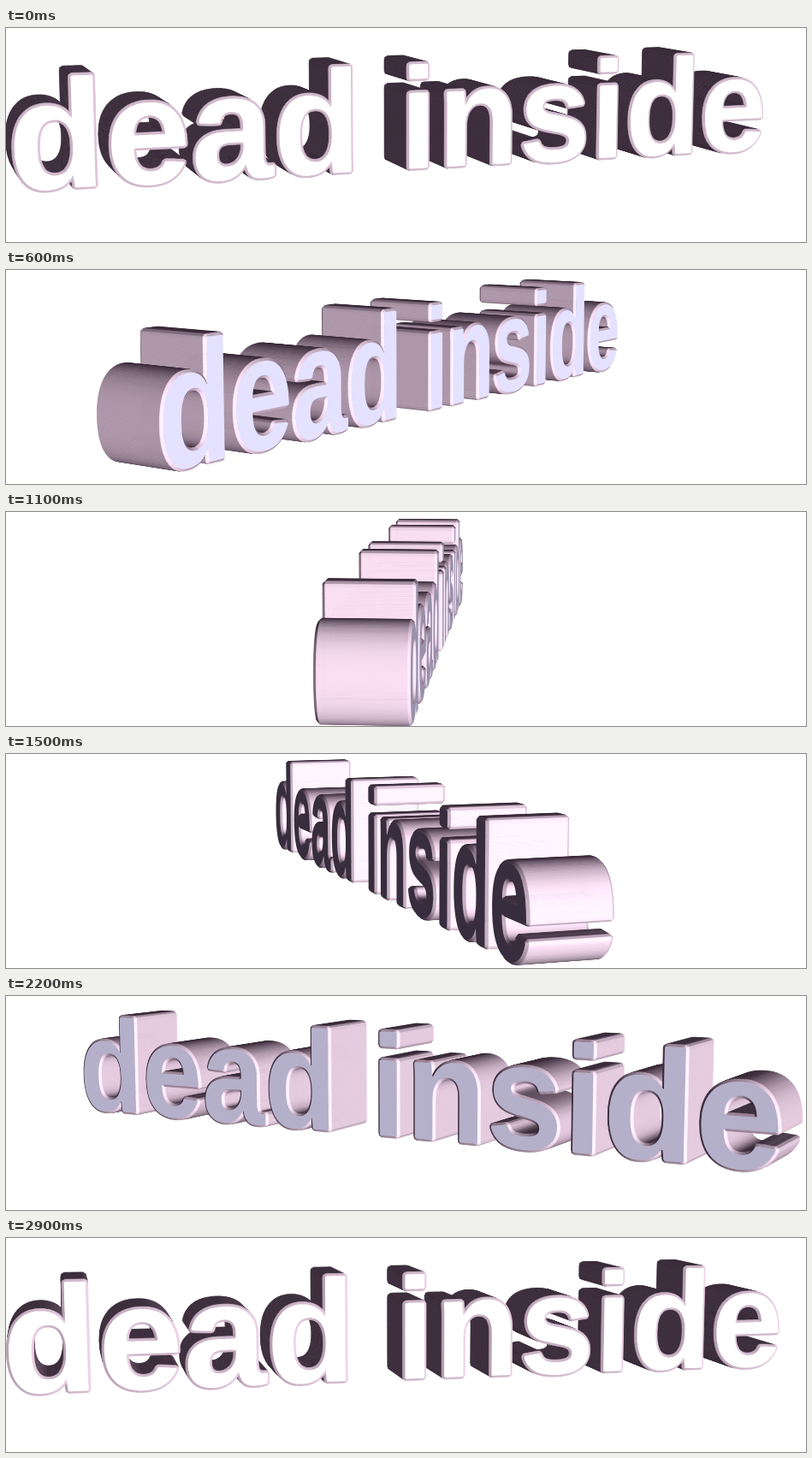
Animation of 935x250 px, one loop 3000 ms. Source, as an HTML page with a canvas:

```html
<!DOCTYPE html>
<html lang="en">
<head>
<meta charset="utf-8">
<title>dead inside</title>
<style>
  html, body { margin: 0; height: 100%; overflow: hidden; background: #fff; }
  canvas { display: block; }
</style>
</head>
<body>
<canvas id="stage" width="935" height="250"></canvas>
<script>
const TEXT = 'dead inside';
const FONT = 'bold 166px Arial, "Liberation Sans", sans-serif';
const CENTER = { x: 468, y: 105 };
const BASELINE = 53, HALF_DEPTH = 43, BEVEL = 2.5;
const DISTANCE = 1800, PITCH = Math.asin(0.13), LIGHT = 23 * Math.PI / 180;
const SIDE = { dark: [58, 43, 58], gain: [217, 203, 210] };
const FACE = { dark: [55, 45, 62], gain: [204, 213, 228] };
// Wall bands from back to front: start z, start offset, end z, end offset, normal z
const BANDS = [
  [-HALF_DEPTH, 0, BEVEL - HALF_DEPTH, BEVEL, -1],
  [BEVEL - HALF_DEPTH, BEVEL, HALF_DEPTH - BEVEL, BEVEL, 0],
  [HALF_DEPTH - BEVEL, BEVEL, HALF_DEPTH, 0, 1]
];

const ctx = document.getElementById('stage').getContext('2d');

// Follow the half-alpha contour of a glyph; the outside lies along (dy, -dx).
function traceGlyph(char) {
  const w = 150, h = 180, left = 15, base = 145;
  const pad = document.createElement('canvas');
  pad.width = w;
  pad.height = h;
  const g = pad.getContext('2d', { willReadFrequently: true });
  g.font = FONT;
  g.fillText(char, left, base);
  const pixels = g.getImageData(0, 0, w, h).data;
  const alpha = ([x, y]) => pixels[4 * (y * w + x) + 3];
  const links = new Map();

  for (let y = 0; y < h - 1; y++) {
    for (let x = 0; x < w - 1; x++) {
      const corners = [[x, y], [x + 1, y], [x + 1, y + 1], [x, y + 1]];
      const edges = [[x, y, 0], [x + 1, y, 1], [x, y + 1, 0], [x, y, 1]];
      const crossings = [];
      corners.forEach((p, i) => {
        const q = corners[(i + 1) % 4], a = alpha(p), b = alpha(q);
        if ((a > 127) === (b > 127)) return;
        const t = (127.5 - a) / (b - a), [ex, ey, side] = edges[i];
        crossings.push({
          key: 2 * (ey * w + ex) + side,
          exit: a > 127,
          point: [p[0] + (q[0] - p[0]) * t - left + 0.5,
                  p[1] + (q[1] - p[1]) * t - base + 0.5]
        });
      });
      crossings.forEach((c, i) => {
        if (c.exit) links.set(c.key, { point: c.point, next: crossings[(i + 1) % crossings.length].key });
      });
    }
  }

  const loops = [];
  while (links.size) {
    let key = links.keys().next().value;
    const loop = [];
    while (links.has(key)) {
      const link = links.get(key);
      links.delete(key);
      loop.push(link.point);
      key = link.next;
    }
    loops.push(withNormals(thin(loop)));
  }
  return loops;
}

// Smooth lightly and keep every second point.
function thin(loop) {
  const n = loop.length;
  return loop
    .map((p, i) => p.map((v, k) => (loop[(i + n - 1) % n][k] + 2 * v + loop[(i + 1) % n][k]) / 4))
    .filter((p, i) => i % 2 === 0);
}

function withNormals(loop) {
  const n = loop.length;
  return loop.map(([x, y], i) => {
    const a = loop[(i + n - 1) % n], b = loop[(i + 1) % n];
    const dx = b[0] - a[0], dy = b[1] - a[1], len = Math.hypot(dx, dy) || 1;
    return { x, y, nx: dy / len, ny: -dx / len };
  });
}

function buildGlyphs() {
  ctx.font = FONT;
  const width = s => ctx.measureText(s).width;
  const total = width(TEXT), shapes = {};
  return [...TEXT].map((char, i) => {
    const x0 = width(TEXT.slice(0, i)) - total / 2;
    shapes[char] ||= traceGlyph(char);
    const loops = shapes[char].map(loop =>
      loop.map(p => ({ ...p, x: p.x + x0, y: p.y + BASELINE })));
    const walls = loops.flatMap(loop => loop.map((p, k) => [p, loop[(k + 1) % loop.length]]));
    return { loops, walls, mid: x0 + width(char) / 2 };
  });
}

const glyphs = buildGlyphs();

function draw(yaw) {
  const sin = Math.sin(yaw), cos = Math.cos(yaw);
  const sinP = Math.sin(PITCH), cosP = Math.cos(PITCH);
  const eye = { x: -DISTANCE * cosP * sin, y: -DISTANCE * sinP, z: DISTANCE * cosP * cos };

  const project = (x, y, z) => {
    const depth = z * cos - x * sin;
    const scale = DISTANCE / (DISTANCE - depth * cosP + y * sinP);
    return [CENTER.x + (x * cos + z * sin) * scale,
            CENTER.y + (y * cosP + depth * sinP) * scale];
  };
  const shade = (material, nx, ny, nz) => {
    const lit = ((nx * cos + nz * sin) * Math.sin(LIGHT) + (nz * cos - nx * sin) * Math.cos(LIGHT))
      / Math.hypot(nx, ny, nz);
    const rgb = material.dark.map((v, i) => Math.min(255, Math.round(v + material.gain[i] * Math.max(0, lit))));
    return `rgb(${rgb})`;
  };
  const addPath = points => {
    points.forEach((p, i) => i ? ctx.lineTo(...p) : ctx.moveTo(...p));
    ctx.closePath();
  };
  const corner = (p, z, r) => project(p.x + p.nx * r, p.y + p.ny * r, z);
  const range = p => Math.hypot(p.x - eye.x, p.y - eye.y);

  const drawWall = ([a, b]) => {
    const nx = a.nx + b.nx, ny = a.ny + b.ny, len = Math.hypot(nx, ny) || 1;
    const ux = nx / len, uy = ny / len;
    for (const [z0, r0, z1, r1, nz] of BANDS) {
      const facing = ux * (eye.x - a.x - ux * BEVEL) + uy * (eye.y - a.y - uy * BEVEL)
        + nz * (eye.z - (z0 + z1) / 2);
      if (facing <= 0) continue;
      ctx.beginPath();
      addPath([corner(a, z0, r0), corner(b, z0, r0), corner(b, z1, r1), corner(a, z1, r1)]);
      ctx.fillStyle = ctx.strokeStyle = shade(SIDE, ux, uy, nz);
      ctx.fill();
      ctx.stroke();
    }
  };

  ctx.fillStyle = '#fff';
  ctx.fillRect(0, 0, 935, 250);
  ctx.lineWidth = 0.7;
  ctx.lineJoin = 'round';
  glyphs.sort((a, b) => Math.abs(b.mid - eye.x) - Math.abs(a.mid - eye.x));
  for (const { loops, walls } of glyphs) {
    walls.sort((a, b) => range(b[0]) - range(a[0])).forEach(drawWall);
    if (eye.z <= HALF_DEPTH) continue;
    ctx.beginPath();
    loops.forEach(loop => addPath(loop.map(p => corner(p, HALF_DEPTH, 0))));
    ctx.fillStyle = shade(FACE, 0, 0, 1);
    ctx.fill('evenodd');
  }
}

// Half a turn in thirty steps of 100 ms, starting again at the edge-on view.
let shown = -1;
function tick() {
  const step = Math.floor(performance.now() / 100) % 30;
  if (step !== shown) {
    shown = step;
    draw(((109 + 6 * step) % 180 - 90) * Math.PI / 180);
  }
  requestAnimationFrame(tick);
}
tick();
</script>
</body>
</html>
```
